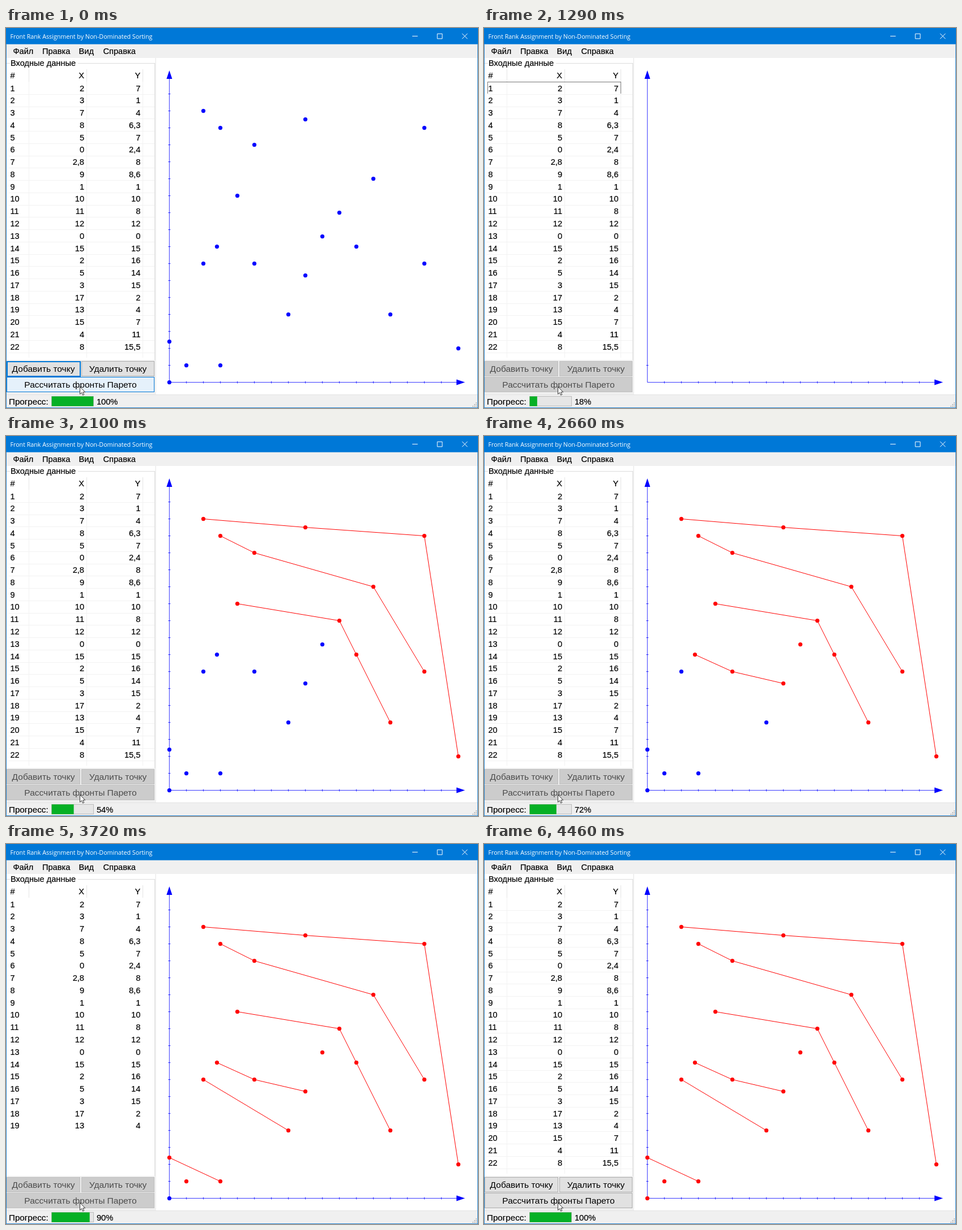
An HTML page for the animation above (4.96 s loop, 833x672 px).

```html
<!DOCTYPE html>
<html lang="ru">
<head>
<meta charset="utf-8">
<title>Non-Dominated Sorting</title>
<style>
html, body { margin: 0; width: 100%; height: 100%; overflow: hidden; background: #fff; }
svg { display: block; }
text { font-family: "Liberation Sans", Arial, sans-serif; font-size: 14.6px; white-space: pre; stroke: #000; stroke-width: .2px; }
.title { font-family: "Open Sans", sans-serif; font-size: 10.7px; fill: #fff; stroke: none; }
.btn text { font-size: 15.5px; text-anchor: middle; stroke: none; }
.end { text-anchor: end; }
.crisp { shape-rendering: crispEdges; }
</style>
</head>
<body>
<svg id="stage" width="100%" height="100%" viewBox="0 0 833 672" xmlns="http://www.w3.org/2000/svg"></svg>
<script>
const LOOP = 4960, ROW = 21.76, UNIT = 30, OX = 288.3, OY = 626.6;
const BAR = 74, BAR_SPEED = 0.033;

const points = [
  [2, 7], [3, 1], [7, 4], [8, 6.3], [5, 7], [0, 2.4], [2.8, 8], [9, 8.6], [1, 1], [10, 10], [11, 8],
  [12, 12], [0, 0], [15, 15], [2, 16], [5, 14], [3, 15], [17, 2], [13, 4], [15, 7], [4, 11], [8, 15.5]
];

// Successive Pareto fronts, maximising both coordinates
function sortFronts(all) {
  const fronts = [];
  let rest = all;
  while (rest.length) {
    const front = rest.filter(p => !rest.some(q => q !== p && q[0] >= p[0] && q[1] >= p[1]));
    rest = rest.filter(p => !front.includes(p));
    fronts.push(front.sort((a, b) => a[0] - b[0]));
  }
  return fronts;
}
const fronts = sortFronts(points);
const rank = new Map(fronts.flatMap((f, i) => f.map(p => [p, i])));

// When each front turns red, and when the progress label follows
const chartTimes = [890, 1320, 1710, 2140, 2550, 2920, 3320, 3720, 4180];
const labelTimes = chartTimes.map(t => t === 3720 ? 3750 : t);
let sum = 0;
const shares = fronts.map(f => (sum += f.length) / points.length);

// Repaint flicker: [start, ticks drawn before the points]
const chartBlinks = [[860, 17], [1290, 1], [1680, 17], [2110, 9], [2520, 17], [2890, 17],
  [3290, 7], [3690, 17], [4150, 12]];
// [start, rows drawn so far]
const tableBlinks = [[2140, 14], [3720, 19]];

const blinkAt = (list, t) => list.find(([s]) => t >= s && t < s + 30);
const passed = (list, t) => list.filter(s => t >= s).length;

const rect = (x, y, w, h, fill, extra = "") =>
  `<rect x="${x}" y="${y}" width="${w}" height="${h}" fill="${fill}" ${extra}/>`;
const path = (d, stroke, extra = "") => `<path d="${d}" fill="none" stroke="${stroke}" ${extra}/>`;
const text = (x, y, s, cls = "", extra = "") => `<text x="${x}" y="${y}" class="${cls}" ${extra}>${s}</text>`;
const px = x => OX + x * UNIT;
const py = y => OY - y * UNIT;
const num = n => String(n).replace(".", ",");

function frame() {
  const menu = [[12.5, "Файл"], [64, "Правка"], [128.5, "Вид"], [171.5, "Справка"]];
  let s = rect(0, 0, 833, 672, "#f0f0f0") + rect(0, 0, 833, 28.7, "#0078d7")
    + text(7.5, 18.7, "Front Rank Assignment by Non-Dominated Sorting", "title")
    + path("M717 14.4h9.6M761.2 10.2h8.7v8.7h-8.7z", "#fff")
    + path("M805 9.8l9.4 9.4M814.4 9.8l-9.4 9.4", "#fff")
    + menu.map(([x, m]) => text(x, 46, m)).join("")
    + rect(1, 53, 262, 534, "#fff") + rect(265, 53, 567, 595, "#fff")
    + path("M1 62.5h6M127 62.5h135.5V587", "#dcdcdc", 'class="crisp"')
    + text(8, 67, "Входные данные");
  s += text(7.5, 89, "#") + text(138, 89, "X", "end") + text(237.3, 89, "Y", "end")
    + path("M40.5 73v22M142.5 73v22M241.5 73v22", "#e5e5e5", 'class="crisp"');
  return s;
}

function table() {
  let grid = "M40.5 95V583M142.5 95V583M241.5 95V583";
  for (let i = 1; i <= points.length; i++) grid += `M5 ${Math.round(95 + i * ROW) + 0.5}H262`;
  const rows = points.map(([x, y], i) => {
    const b = (111.6 + i * ROW).toFixed(1);
    return `<g class="row">${text(7.5, b, i + 1)}${text(138, b, num(x), "end")}${text(237.3, b, num(y), "end")}</g>`;
  });
  return path(grid, "#f2f2f2", 'id="grid" class="crisp"') + rows.join("")
    + path("M6.5 116V95.5H241.5V116", "#777", 'id="focus" class="crisp"');
}

function button(id, x, y, w, h, label) {
  return `<g class="btn" id="${id}">${rect(x + .5, y + .5, w - 1, h - 1, "#e1e1e1", 'class="crisp"')}`
    + text(x + w / 2, y + h / 2 + 5.3, label) + "</g>";
}

function chart() {
  let s = path(`M${OX} ${OY}V80M${OX} ${OY}H800`, "#00f", 'stroke-width=".8"')
    + `<path d="M${OX} 75l5 15h-10zM810 ${OY}l-15 5v-10z" fill="#00f"/>`;
  let ticks = "";
  for (let i = 1; i <= 16; i++) ticks += `M${px(i)} ${OY - 2}v4`;
  s += path(ticks, "#00f", 'stroke-width=".8"');
  for (let i = 1; i <= 17; i++) s += path(`M${OX - 2} ${py(i)}h4`, "#00f", 'class="tick" stroke-width=".8"');
  s += '<g id="plot">';
  for (const f of fronts)
    s += path("M" + f.map(([x, y]) => `${px(x)} ${py(y)}`).join("L"), "#f00", 'class="front"');
  for (const [x, y] of points) s += `<circle class="dot" cx="${px(x)}" cy="${py(y)}" r="3.6"/>`;
  return s + "</g>";
}

function status() {
  let grip = "";
  for (let i = 0; i < 3; i++)
    for (let j = 0; j <= i; j++) grip += rect(829 - j * 3, 662 + i * 3, 2, 2, "#bfbfbf");
  return path("M1 648.5H832", "#e3e3e3", 'class="crisp"')
    + text(5, 665.5, "Прогресс:", "", 'style="font-size:15.2px"')
    + rect(80.5, 651.5, 74, 17, "#e6e6e6", 'stroke="#bcbcbc" class="crisp"')
    + '<defs><linearGradient id="glow"><stop offset="0" stop-color="#fff" stop-opacity="0"/>'
    + '<stop offset=".5" stop-color="#fff" stop-opacity=".35"/><stop offset="1" stop-color="#fff" stop-opacity="0"/></linearGradient></defs>'
    + `<svg id="bar" x="80.4" y="651.3" width="74" height="17.5">${rect(0, 0, BAR, 18, "#06b025")}`
    + rect(0, 0, 44, 18, "url(#glow)", 'id="shine"') + "</svg>"
    + text(160, 665.5, "100%", "", 'id="label"') + grip;
}

const stage = document.getElementById("stage");
stage.innerHTML = frame() + table()
  + button("add", 1, 589, 130, 27, "Добавить точку")
  + button("del", 133, 589, 129, 27, "Удалить точку")
  + button("run", 1, 617, 261, 27, "Рассчитать фронты Парето")
  + chart() + status()
  + path("M.5 28V671.5H832.5V28", "#2a86d0", 'class="crisp"')
  + '<path d="M130.5 634.5v13l3-2.8 2 4.6 2.2-1-2-4.4h4z" fill="#fff" stroke="#222" stroke-width=".9"/>';

const $ = id => document.getElementById(id);
const all = c => [...stage.querySelectorAll("." + c)];
const rows = all("row"), ticks = all("tick"), lines = all("front"), dots = all("dot");
const show = (el, on) => el.setAttribute("visibility", on ? "visible" : "hidden");

const looks = {
  normal: ["#e1e1e1", "#adadad", 1, "#000"],
  focused: ["#e1e1e1", "#0078d7", 2, "#000"],
  hover: ["#e5f1fb", "#0078d7", 1, "#000"],
  pressed: ["#cce4f7", "#005499", 1, "#000"],
  off: ["#ccc", "#bfbfbf", 1, "#4c4c4c"]
};
function paintButton(id, look) {
  const [fill, stroke, width, ink] = looks[look];
  const [box, label] = $(id).children;
  box.setAttribute("fill", fill);
  box.setAttribute("stroke", stroke);
  box.setAttribute("stroke-width", width);
  label.setAttribute("fill", ink);
}

// The fill creeps towards each new value at a constant speed
function barWidth(t) {
  if (t < 860) return BAR;
  if (t < labelTimes[0]) return 0;
  let w = shares[0] * BAR;
  for (let i = 1; i < shares.length && t >= labelTimes[i]; i++) {
    const until = Math.min(t, labelTimes[i + 1] ?? LOOP);
    w = Math.min(shares[i] * BAR, w + BAR_SPEED * (until - labelTimes[i]));
  }
  return w;
}

function draw(t) {
  const busy = t >= 860 && t < 4180;
  paintButton("add", busy ? "off" : t < 430 ? "focused" : "normal");
  paintButton("del", busy ? "off" : "normal");
  paintButton("run", busy ? "off" : t < 430 ? "hover" : t < 860 ? "pressed" : "normal");

  const partial = blinkAt(tableBlinks, t);
  rows.forEach((r, i) => show(r, !partial || i < partial[1]));
  show($("grid"), !partial);
  show($("focus"), t >= 860 && t < 1320);

  const blank = blinkAt(chartBlinks, t);
  const done = passed(chartTimes, t);
  ticks.forEach((k, i) => show(k, !blank || i < blank[1]));
  $("plot").style.display = blank ? "none" : "";
  lines.forEach((l, i) => show(l, i < done));
  dots.forEach((d, i) => d.setAttribute("fill", rank.get(points[i]) < done ? "#f00" : "#00f"));

  const step = passed(labelTimes, t);
  const share = t < 860 ? 1 : step ? shares[step - 1] : 0;
  $("label").textContent = Math.floor(share * 100) + "%";
  $("bar").setAttribute("width", barWidth(t).toFixed(2));
  $("shine").setAttribute("x", ((t - 1710) * 0.1 - 2).toFixed(1));
  show($("shine"), t > 1290 && t < 2500);
}

const start = performance.now();
function tick() {
  draw((performance.now() - start) % LOOP);
  requestAnimationFrame(tick);
}
tick();
</script>
</body>
</html>
```
